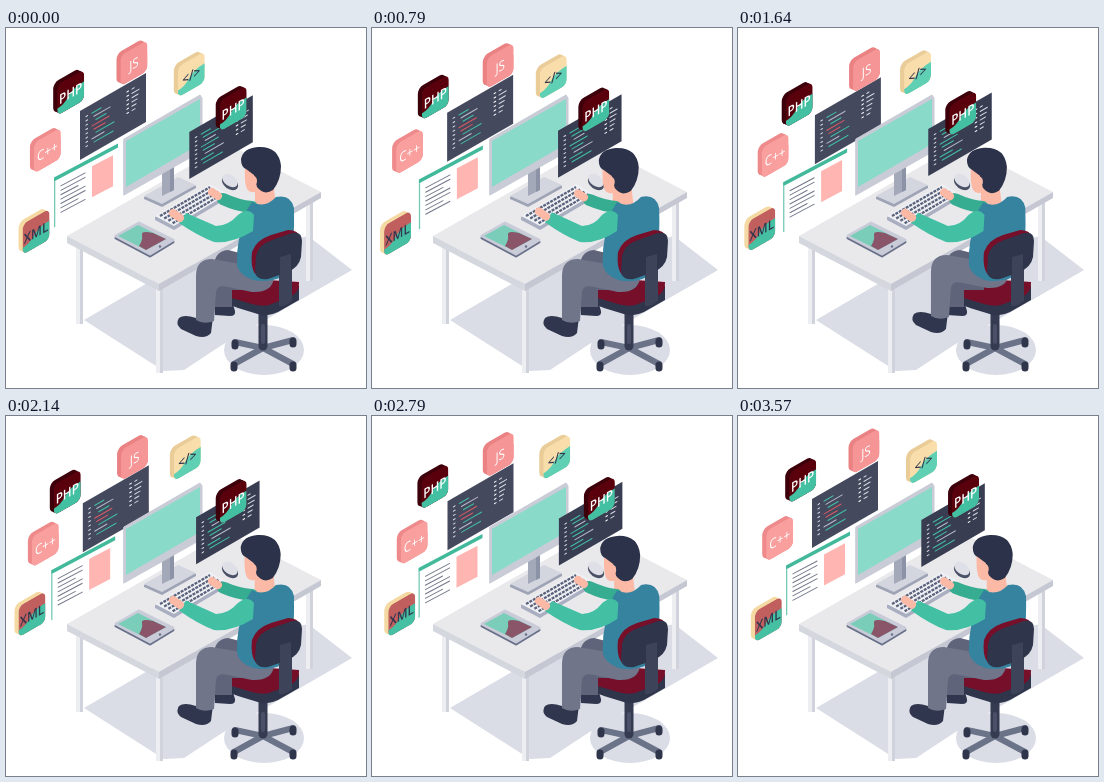
An HTML page that plays this animation: 360x360 px, repeating every 3.64 s.

```html
<!DOCTYPE html>
<html lang="en">
<meta charset="utf-8">
<style>
  html, body { margin: 0; width: 100%; height: 100%; overflow: hidden; background: #fff }
  svg { display: block; width: 100vw; height: 100vh }
  text { font-family: "Open Sans", sans-serif; text-anchor: middle }
</style>
<svg viewBox="0 0 360 360" stroke-linecap="round" stroke-linejoin="round">
  <defs><clipPath id="face"><rect width="31" height="31" rx="6"/></clipPath></defs>

  <g fill="#dadce6">
    <path d="M78 292L162 243 302 208 346 242 216 317 178 342 158 343Z"/>
    <ellipse cx="258" cy="322" rx="40" ry="25"/>
  </g>

  <g id="legs"></g>
  <path fill="#e9e9ec" d="M61 208L222 116 315 164 153 256Z"/>
  <path fill="#d5d7de" d="M61 208L153 256V263L61 215Z"/>
  <path fill="#c5c8d2" d="M153 256L315 164V170L153 263Z"/>

  <g id="page"></g>
  <g id="codeA"></g>

  <!-- monitor -->
  <path fill="#9ea3b5" d="M138 169L172 150 190 158V160L156 179 138 171Z"/>
  <path fill="#d3d6df" d="M138 168L172 149 190 157 156 176Z"/>
  <path fill="#a4a9ba" d="M156 143L168 137V162L156 168Z"/>
  <path fill="#8d93a7" d="M164 140L168 137V162L164 164Z"/>
  <path fill="#c9ccd6" stroke="#c9ccd6" d="M118 111L194 67 196 70V123L118 167Z"/>
  <path fill="#8adaca" d="M120 113L194 71V116L120 159Z"/>
  <g id="codeB"></g>

  <!-- keyboard, mouse, tablet -->
  <path fill="#a9aec0" d="M149 189L204 157 222 167V170L168 202 149 192Z"/>
  <path fill="#eff0f4" d="M149 188L204 156 222 166 168 198Z"/>
  <g id="keys" stroke="#5a627c" stroke-width="2.300" stroke-linecap="butt" stroke-dasharray="3 1"></g>
  <ellipse cx="224" cy="155" rx="9" ry="6" fill="#4a5066" transform="rotate(35 224 155)"/>
  <ellipse cx="224" cy="152.500" rx="8.500" ry="5.500" fill="#dfe0e7" transform="rotate(35 224 152.500)"/>
  <path fill="#697089" stroke="#697089" stroke-width="3" d="M110 210L133 197 167 214 144 228Z"/>
  <path fill="#c9ccd8" stroke="#c9ccd8" stroke-width="3" d="M110 208L133 195 167 212 144 226Z"/>
  <path fill="#79cdb9" d="M112 208L132 197 160 211 140 222Z"/>
  <path fill="#8a5469" d="M133 218Q137 212 136 207T147 205L160 211 140 222Z"/>
  <circle cx="154" cy="218.500" r="1.200" fill="#697089"/>

  <!-- chair base and seat -->
  <g id="base"></g>
  <path fill="#2f354b" d="M213 262Q214 273 232 280L255 287Q262 288 272 284L293 272V258Z"/>
  <path fill="#760f29" d="M213 261Q214 250 230 250L293 254Q294 264 284 269L263 277Q256 279 246 276L222 269Q214 267 213 261Z"/>

  <!-- legs of the sitter -->
  <path fill="#30364d" d="M208 274L226 273 229 283Q230 288 224 288L209 287Z"/>
  <path fill="#5f647a" d="M207 279V244Q207 223 222 222L246 228V262L226 262V279Z"/>
  <g id="foot">
    <path fill="#30364d" d="M190 287L207 289 205 305Q200 311 190 308L175 301Q169 296 173 290 178 286 190 290Z"/>
    <path fill="#70758a" d="M190 292V248Q190 231 206 231L235 236 268 250Q266 265 246 264L222 259Q211 256 210 264L208 293Q198 297 190 292Z"/>
  </g>

  <!-- upper body -->
  <g id="head">
    <path fill="#fbb9a6" d="M239 138Q238 154 241 161 244 165 249 164V180L270 178 267 152 248 136Z"/>
    <path fill="#2c3249" d="M235 131Q237 120 252 119 273 118 275 138 275 152 267 162 258 168 251 159L248 147 240 141Q235 139 235 131Z"/>
    <ellipse cx="247.500" cy="153" rx="3.500" ry="5" fill="#fbb9a6"/>
  </g>
  <path id="farArm" fill="none" stroke="#36ac90" stroke-width="12"/>
  <path id="torso" fill="#3683a0" d="M241 182L246 174Q259 181 270 169 285 166 288 180 289 215 283 245 266 256 247 252 233 247 231 237 230 210 240 192Z"/>
  <path id="nearArm" fill="#43c0a4"/>
  <g id="hands" stroke="#fbb9a6" stroke-width="8"><path id="handA" d="M174 190L167 185"/><path id="handB" d="M212 167L206 163"/></g>

  <!-- chair back -->
  <path fill="#3d4358" d="M273 228L286 225V273Q280 279 273 278Z"/>
  <path fill="#760f29" d="M246 224Q250 212 265 207L282 202Q293 202 294 210L291 236 252 248Q244 244 246 224Z"/>
  <path fill="#2f354b" d="M250 228Q252 217 266 212L286 205Q296 203 296 213L295 229Q293 239 282 244L262 251Q250 253 249 243Z"/>
  <path fill="#3d4359" d="M274 229L285 226V272Q280 277 274 276Z"/>

  <g id="icons"></g>
</svg>
<script>
const LOOP = 3640, STEP = 70;
const $ = id => document.getElementById(id);
const line = (x1, y1, x2, y2, color, width = 1.2) =>
  `<path d="M${x1} ${y1}L${x2} ${y2}" stroke="${color}" stroke-width="${width}"/>`;
const rect = (x, y, w, h, fill) => `<rect x="${x}" y="${y}" width="${w}" height="${h}" fill="${fill}"/>`;

$('legs').innerHTML = [[70, 218, 78], [150, 260, 85], [300, 174, 79]]
  .map(([x, y, h]) => rect(x, y, 4, h, '#eceef2') + rect(x + 4, y, 3, h, '#d0d3dc')).join('');

for (let row = 0; row < 4; row++) {
  const x = 154 + row * 4.2, y = 188 + row * 2.4;
  $('keys').innerHTML += `<path d="M${x} ${y}l50 -29"/>`;
}

$('base').innerHTML = [[229, 314], [287, 312], [228, 336], [287, 336], [257, 305]].map(([x, y]) =>
  line(257, 320, x, y, '#6b7388', 6) + line(x, y + 1, x, y + 4, '#2f354b', 7)).join('')
  + line(257, 283, 257, 318, '#353b51', 9) + line(257, 298, 257, 314, '#4a5067', 4);

function codePanel(w, h, fill, colors) {
  let s = rect(0, 0, w, h, fill);
  for (let i = 0; i < 8; i++) {
    const y = 9 + i * 4.3, x = 12 + i % 3 * 2;
    s += line(6, y, 7.5, y, '#d8dae2') + line(x, y, x + 9 + i * 7 % 13, y, colors[i % colors.length]);
  }
  for (let i = 0; i < 6; i++)
    s += line(47, 8 + i * 4.3, 48.5, 8 + i * 4.3, '#fff') + line(52, 8 + i * 4.3, 54 + i * 5 % 6, 8 + i * 4.3, '#d8dae2');
  return s;
}
$('codeA').innerHTML = codePanel(66, 49, '#44495e', ['#43c0a4', '#b9bdca', '#43c0a4', '#d95b62', '#d95b62']);
$('codeB').innerHTML = codePanel(63.5, 47, '#383d52', ['#43c0a4', '#43c0a4', '#b9bdca']);

let page = rect(0, 0, 64, 49, '#fff') + rect(0, -1, 64, 4, '#43b99c')
  + rect(0, 3, 1.3, 46, '#76c9b5') + rect(38, 8, 21, 31, '#ffb5b2');
for (let i = 0; i < 7; i++) page += line(7, 11 + i * 4.4, i % 3 == 2 ? 24 : 31, 11 + i * 4.4, '#72778a', 1.1);
$('page').innerHTML = page;

// label, weight, side, upper, lower, ink, [x, swing, peak time], [y, swing, peak time]
const icons = [
  ['PHP', 600, '#3d000b', '#5a000d', '#43bfa2', '#fff', [45.4, 1.8, 0], [48.6, 6.3, 1820]],
  ['JS', 400, '#ea8283', '#f69596', '#f69596', '#fff', [110.8, .3, 1820], [16.4, 3.5, 1820]],
  ['</>', 600, '#e9cc98', '#f9deab', '#5fd0b3', '#30364d', [165.2, 3.3, 3250], [22.8, 4, 700]],
  ['PHP', 600, '#3d000b', '#5a000d', '#43bfa2', '#fff', [209, 3, 2870], [61, 2.7, 1900]],
  ['C++', 400, '#ee8a8b', '#f9a09f', '#f9a09f', '#fff', [22.2, 3.1, 3070], [103.2, 3, 2000]],
  ['XML', 600, '#f5d9a2', '#c05f5e', '#45c0a3', '#30364d', [9.8, 3.7, 3220], [179.5, 4, 600]],
];
$('icons').innerHTML = icons.map(([label, weight, side, upper, lower, ink]) => `<g>
  <rect x="-4.600" y="-4" width="31" height="31" rx="6" fill="${side}"/>
  <rect x="-2.300" y="-2" width="31" height="31" rx="6" fill="${side}"/>
  <g clip-path="url(#face)">${rect(0, 0, 31, 31, upper)}
    <path d="M0 24Q8 24 13 18T31 12V31H0Z" fill="${lower}"/></g>
  <text x="15.500" y="21" font-size="13.500" font-weight="${weight}" fill="${ink}">${label.replace('<', '&lt;')}</text></g>`).join('');

const place = (el, slope, x, y, sx = 1) => el.setAttribute('transform', `matrix(${sx} ${-slope} 0 1 ${x} ${y})`);
const hump = (t, from, to, power = 1) =>
  t > from && t < to ? Math.sin(Math.PI * (t - from) / (to - from)) ** power : 0;

function draw(t) {
  const swing = ([mid, size, peak]) => mid + size * Math.cos(2 * Math.PI * (t - peak) / LOOP);
  const drift = swing([.5, .5, LOOP / 2]);
  icons.forEach((icon, i) =>
    place($('icons').children[i], .5, swing(icon[6]) + 4, swing(icon[7]) + 14.5, .87));
  place($('codeA'), .577, 74 + 3 * drift, 83 + 4.5 * drift);
  place($('codeB'), .577, 183.3 + 7.2 * drift, 104 - 3 * drift);
  place($('page'), .53, 48 - 3 * drift, 150.5 + 5 * drift);

  const lean = 9.3 * hump(t, 0, 2140, 1.2) + 7.2 * hump(t, 2140, 3600, 1.2);
  $('head').setAttribute('transform', `translate(${-lean} ${lean * .13})`);
  $('torso').setAttribute('transform', `rotate(${-lean * .1} 262 245)`);
  const lift = hump(t, 1250, 2060);
  $('foot').setAttribute('transform', `translate(${3 * lift} ${-4 * lift})`);

  const tap = 1.5 * Math.sin(2 * Math.PI * t / 455), pull = lean * .25, wrist = tap / 2;
  $('handA').setAttribute('transform', `translate(0 ${tap})`);
  $('handB').setAttribute('transform', `translate(0 ${1 - tap})`);
  $('nearArm').setAttribute('d', `M180 ${185 + wrist}L210 198Q222 198 ${232 - pull} 187 ${242 - pull} 179 ${248 - pull} 187
    L${247 - pull} 203Q226 216 208 214 192 208 173 ${195 + wrist}Z`);
  $('farArm').setAttribute('d', `M${246 - pull} 179Q232 178 217 ${171 - wrist}`);
}

function frame(now) {
  draw(Math.floor(now % LOOP / STEP) * STEP);
  requestAnimationFrame(frame);
}
draw(0);
requestAnimationFrame(frame);
</script>
</html>
```
